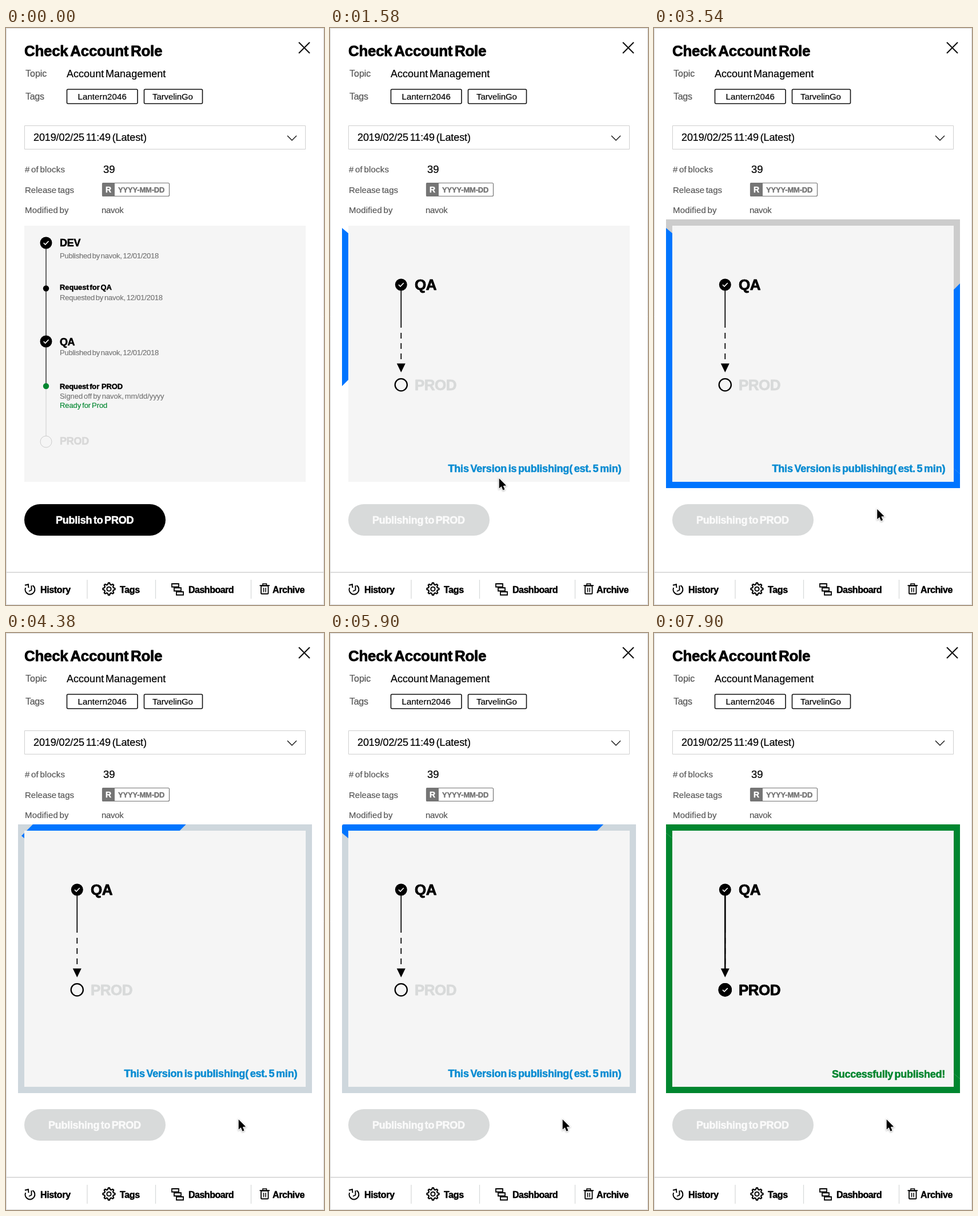
Animation of 556 by 1007 pixels, one loop 8 s. Source, as an HTML page with a canvas:

```html
<!DOCTYPE html>
<html lang="en">
<head>
<meta charset="utf-8">
<title>Check Account Role</title>
<style>
  html, body { margin: 0; width: 100%; height: 100%; overflow: hidden; background: #fff; }
  canvas { display: block; width: 556px; height: 1007px; }
</style>
</head>
<body>
<canvas id="stage" width="556" height="1007"></canvas>
<script>
const ctx = document.getElementById('stage').getContext('2d');
const LOOP = 8000;
const BLUE = [0, 117, 255], GRAY = [204, 204, 204], COOL = [206, 215, 221];
const GREEN = '#00862f', FAINT = '#d8dada', PALE = '#f5f5f5';

const clamp = v => Math.max(0, Math.min(1, v));
const span = (t, from, to) => clamp((t - from) / (to - from));
const ease = p => (1 - Math.cos(Math.PI * p)) / 2;
const lerp = (a, b, p) => a + (b - a) * p;
const mix = (a, b, p) => `rgb(${a.map((v, i) => Math.round(lerp(v, b[i], p))).join(',')})`;

function faded(alpha, draw) {
  if (alpha <= 0) return;
  ctx.save();
  ctx.globalAlpha *= alpha;
  draw();
  ctx.restore();
}

// Word gaps are narrow; the letters share the room this frees.
function text(str, x, y, size, color, spacing = 0, bold = false) {
  const gap = size * 0.12, gaps = str.split(' ').length - 1;
  ctx.font = `${bold ? 'bold ' : ''}${size}px "Liberation Sans", Arial, sans-serif`;
  ctx.wordSpacing = -gap + 'px';
  ctx.letterSpacing = spacing + gap * gaps / str.length + 'px';
  ctx.fillStyle = ctx.strokeStyle = color;
  ctx.lineWidth = size / (bold ? 32 : 80);
  ctx.lineJoin = 'round';
  ctx.fillText(str, x, y);
  ctx.strokeText(str, x, y);
  ctx.lineJoin = 'miter';
}
const boldText = (str, x, y, size, color, spacing) => text(str, x, y, size, color, spacing, true);

function path(points, color, width, close) {
  ctx.beginPath();
  points.forEach(([x, y]) => ctx.lineTo(x, y));
  if (close) ctx.closePath();
  ctx.strokeStyle = color;
  ctx.lineWidth = width;
  ctx.stroke();
}
const vline = (x, y0, y1, color, width) => path([[x, y0], [x, y1]], color, width);

function box(x, y, w, h, r, fill, stroke, width) {
  ctx.beginPath();
  ctx.roundRect(x, y, w, h, r);
  if (fill) { ctx.fillStyle = fill; ctx.fill(); }
  if (stroke) { ctx.strokeStyle = stroke; ctx.lineWidth = width; ctx.stroke(); }
}

function disc(x, y, r, fill, stroke, width) {
  ctx.beginPath();
  ctx.arc(x, y, r, 0, Math.PI * 2);
  if (fill) { ctx.fillStyle = fill; ctx.fill(); }
  if (stroke) { ctx.strokeStyle = stroke; ctx.lineWidth = width; ctx.stroke(); }
}

function checked(x, y, r = 10.5) {
  disc(x, y, r, '#000');
  path([[x - 4.3, y], [x - 1.3, y + 3], [x + 4.5, y - 3]], '#fff', 1.7);
}

function header() {
  boldText('Check Account Role', 32, 49, 26, '#000', -0.65);
  path([[512, 25], [531, 44]], '#111', 2.2);
  path([[531, 25], [512, 44]], '#111', 2.2);
  text('Topic', 34, 85, 16, '#555');
  text('Account Management', 106, 86, 18, '#000', -0.1);
  text('Tags', 34, 125, 16, '#555', -0.3);
  box(106.5, 107, 123.5, 25, 2, null, '#111', 1.6);
  text('Lantern2046', 125.5, 125, 15, '#000', 0.1);
  box(241.5, 107, 102, 25, 2, null, '#111', 1.6);
  text('TarvelinGo', 256, 125, 15, '#000', -0.1);

  box(32.5, 170.5, 491, 41, 0, null, '#cfcfcf', 1);
  text('2019/02/25 11:49 (Latest)', 48, 197, 18, '#000', -0.28);
  path([[492, 188], [500, 196], [508, 188]], '#111', 1.4);

  text('# of blocks', 33, 252, 15, '#555', -0.15);
  text('39', 170, 253, 18.5, '#000');
  text('Release tags', 33, 288, 15, '#555', -0.12);
  box(168.5, 270.5, 117, 23, 2, '#fff', '#757575', 1.2);
  box(168, 270, 22, 24, [2, 0, 0, 2], '#757575');
  boldText('R', 174, 287, 14, '#fff');
  boldText('YYYY-MM-DD', 196, 287, 13, '#757575', -0.18);
  text('Modified by', 33, 323, 15, '#555');
  text('navok', 167, 323, 15, '#555', -0.3);
}

function historyIcon(x, y) {
  ctx.beginPath();
  ctx.arc(x, y, 8.4, -1, Math.PI * 1.12);
  ctx.strokeStyle = '#000';
  ctx.lineWidth = 2;
  ctx.stroke();
  path([[x - 9, y - 7.5], [x - 3, y - 9], [x - 2.5, y - 3]], '#000', 1.9);
  path([[x + 2.5, y - 7], [x + 2.5, y + 1], [x - 2, y + 3]], '#000', 1.9);
}

function gearIcon(x, y) {
  ctx.beginPath();
  for (let i = 0; i < 32; i++) {
    const r = i % 4 < 2 ? 10.6 : 8, a = (i - 0.5) * Math.PI / 16;
    ctx.lineTo(x + r * Math.cos(a), y + r * Math.sin(a));
  }
  ctx.closePath();
  ctx.strokeStyle = '#000';
  ctx.lineWidth = 2.2;
  ctx.stroke();
  disc(x, y, 3.6, null, '#000', 2);
}

function footer() {
  ctx.fillStyle = '#dcdcdc';
  ctx.fillRect(0, 949, 556, 2);
  [142, 261.5, 428.5].forEach(x => vline(x, 963, 996, FAINT, 1.3));
  historyIcon(42, 980);
  boldText('History', 60, 986, 16, '#000', -0.35);
  gearIcon(180, 979);
  boldText('Tags', 199, 986, 16, '#000', -0.35);
  [[290, 970], [294, 977], [298, 984]].forEach(([x, y]) => box(x, y, 12, 5.5, 0, '#fff', '#000', 1.8));
  boldText('Dashboard', 319, 986, 16, '#000', -0.5);
  box(446, 973.5, 12.5, 14, 1, null, '#000', 1.8);
  path([[443.5, 973], [461, 973]], '#000', 1.8);
  path([[449, 972], [449, 970], [455.5, 970], [455.5, 972]], '#000', 1.6);
  [450.5, 454].forEach(x => vline(x, 977, 984.5, '#000', 1.5));
  boldText('Archive', 466, 986, 16, '#000', -0.4);
  box(0.5, 0.5, 555, 1006, 0, null, '#d8d8d8', 1);
}

function button(label, x, fill, color) {
  box(32, 831, 247, 55, 27.5, fill);
  boldText(label, x, 865, 18, color, -0.52);
}

function idleSteps() {
  vline(70, 385, 625, '#555', 1.8);
  vline(70, 630, 712, '#ccc', 1);
  checked(70, 375);
  boldText('DEV', 94, 381, 18, '#000', -0.2);
  text('Published by navok, 12/01/2018', 94, 402, 13, '#757575', -0.4);
  disc(70, 454.5, 5.2, '#000');
  boldText('Request for QA', 94, 457, 13, '#000', -0.32);
  text('Requested by navok, 12/01/2018', 94, 475, 13, '#757575', -0.37);
  checked(70, 547);
  boldText('QA', 94, 554, 18, '#000', -0.4);
  text('Published by navok, 12/01/2018', 94, 571, 13, '#757575', -0.4);
  disc(70, 625, 5.2, GREEN);
  boldText('Request for  PROD', 94, 630, 13, '#000', -0.42);
  text('Signed off by navok, mm/dd/yyyy', 94, 647, 13, '#757575', -0.26);
  text('Ready for Prod', 94, 663, 13, GREEN, -0.3);
  disc(70, 722, 10, PALE, '#ccc', 1);
  boldText('PROD', 94, 727, 18, '#d8d8d8', -0.25);
}

function publishSteps(t) {
  const p = ease(span(t, 1020, 1500));
  const x = lerp(70.5, 124.3, p), y = lerp(546.5, 448, p);
  const size = lerp(18, 26, p), labelX = lerp(94, 148, p);

  faded(1 - p, () => {
    vline(70, 385, 536, '#ccc', 1);
    disc(70, 375, 10, PALE, '#ccc', 1);
    boldText('DEV', 94, 381, 18, FAINT, -0.2);
    vline(x, y + 152, y + 165, '#ccc', 1);
  });

  vline(x, y + 10, y + 75, '#111', 1.9);
  [84, 102, 120].forEach(d => vline(x, y + d, y + d + 10, '#111', 1.9));
  const solid = span(t, 7220, 7380);
  if (solid) vline(x, y + 10, lerp(y + 75, y + 140, solid), '#000', 2.5);
  ctx.beginPath();
  ctx.moveTo(x - 7.5, y + 137.5);
  ctx.lineTo(x + 7.5, y + 137.5);
  ctx.lineTo(x, y + 153);
  ctx.fillStyle = '#000';
  ctx.fill();

  checked(x, y);
  boldText('QA', labelX, y + size * 0.35, size, '#000', -0.5);

  const prodY = y + 174.8;
  disc(x, prodY, lerp(10, 10.6, p), PALE, mix(GRAY, [0, 0, 0], p), lerp(1, 2.3, p));
  faded(span(t, 7320, 7460), () => checked(x, prodY, 11.7));
  const dark = span(t, 7600, 7900);
  boldText('PROD', labelX, prodY + size * 0.34, size, mix([216, 218, 218], [0, 0, 0], dark), -0.5);

  faded(Math.min(span(t, 1120, 1500), 1 - span(t, 6640, 6940)), () =>
    boldText('This Version is publishing( est. 5 min)', 206.5, 775, 18, '#0a8cd2', -0.52));
  faded(dark, () => boldText('Successfully published!', 311, 776, 18, GREEN, -0.35));
}

function frame(color) {
  ctx.beginPath();
  ctx.rect(21, 334, 514, 469);
  ctx.rect(32, 345, 492, 447);
  ctx.fillStyle = color;
  ctx.fill('evenodd');
}

// Half of the frame, cut to the diagonal band lo < x + y < hi.
function half(upper, lo, hi, color) {
  if (hi <= lo) return;
  ctx.save();
  ctx.beginPath();
  const edge = upper ? 300 : 840;
  [[0, edge], [0, 331.5], [556, 795.5], [556, edge]].forEach(([x, y]) => ctx.lineTo(x, y));
  ctx.clip();
  ctx.beginPath();
  [[lo, 0], [hi, 0], [hi - 1000, 1000], [lo - 1000, 1000]].forEach(([x, y]) => ctx.lineTo(x, y));
  ctx.clip();
  frame(color);
  ctx.restore();
}

const PHASE = 358, LO = 354, HI = 1340, JOINT = 1313;
const LAPS = [1475, 3059, 4640], FINAL_LAP = 6224;
const FIRST_WIPE = LAPS[0] + 2 * PHASE;

// The lower half draws in, then the upper; then both wipe in the same order.
function lap(t, start, color, wipes) {
  const phase = i => span(t, start + i * PHASE, start + (i + 1) * PHASE);
  const drawLow = phase(0), drawUp = phase(1);
  const wipeLow = wipes ? phase(2) : 0, wipeUp = wipes ? phase(3) : 0;
  half(false, wipeLow ? lerp(370, HI, wipeLow) : LO, lerp(LO, HI, drawLow), color);
  const from = drawUp < 1 ? lerp(JOINT, LO, drawUp) : LO + Math.max(0, wipeUp - 0.5) * 140;
  if (drawUp) half(true, from, wipeUp ? lerp(JOINT, LO, wipeUp) : HI, color);
}

function progress(t) {
  if (t < LAPS[0]) frame('#fdfdfd');
  if (t >= FIRST_WIPE) {
    const cool = span(t, 4000, 4300);
    frame(cool ? mix(GRAY, COOL, cool) : mix(BLUE, GRAY, span(t, FIRST_WIPE, FIRST_WIPE + 500)));
  }
  LAPS.forEach(start => {
    if (t >= start && t < start + 4 * PHASE) lap(t, start, `rgb(${BLUE})`, true);
  });
  if (t >= FINAL_LAP) lap(t, FINAL_LAP, GREEN, false);
}

function cursor(t) {
  if (t < 300) return;
  const a = ease(span(t, 300, 780)), b = ease(span(t, 2890, 3760));
  ctx.save();
  ctx.translate(lerp(499, 295.7, a) + 111 * b, lerp(10, 786, a) + 63 * b);
  ctx.beginPath();
  [[0, 0], [0, 17.5], [4, 14], [6.7, 20.5], [9.8, 19.2], [7.1, 12.9], [12.4, 12.5]]
    .forEach(([x, y]) => ctx.lineTo(x, y));
  ctx.closePath();
  ctx.shadowColor = 'rgba(0,0,0,0.35)';
  ctx.shadowBlur = 3;
  ctx.shadowOffsetY = 1;
  ctx.strokeStyle = '#fff';
  ctx.lineWidth = 2;
  ctx.stroke();
  ctx.shadowColor = 'transparent';
  ctx.fillStyle = '#000';
  ctx.fill();
  ctx.restore();
}

function render(t) {
  ctx.fillStyle = '#fff';
  ctx.fillRect(0, 0, 556, 1007);
  header();
  footer();
  const publishing = t >= 1020;
  if (publishing) progress(t);
  ctx.fillStyle = PALE;
  ctx.fillRect(32, 345, 492, 447);
  if (publishing) {
    publishSteps(t);
    button('Publishing to PROD', 74, FAINT, '#fafafa');
  } else {
    idleSteps();
    button('Publish to PROD', 87, '#000', '#fff');
  }
  cursor(t);
}

const begin = performance.now();
function tick() {
  render((performance.now() - begin) % LOOP);
  requestAnimationFrame(tick);
}
tick();
</script>
</body>
</html>
```
